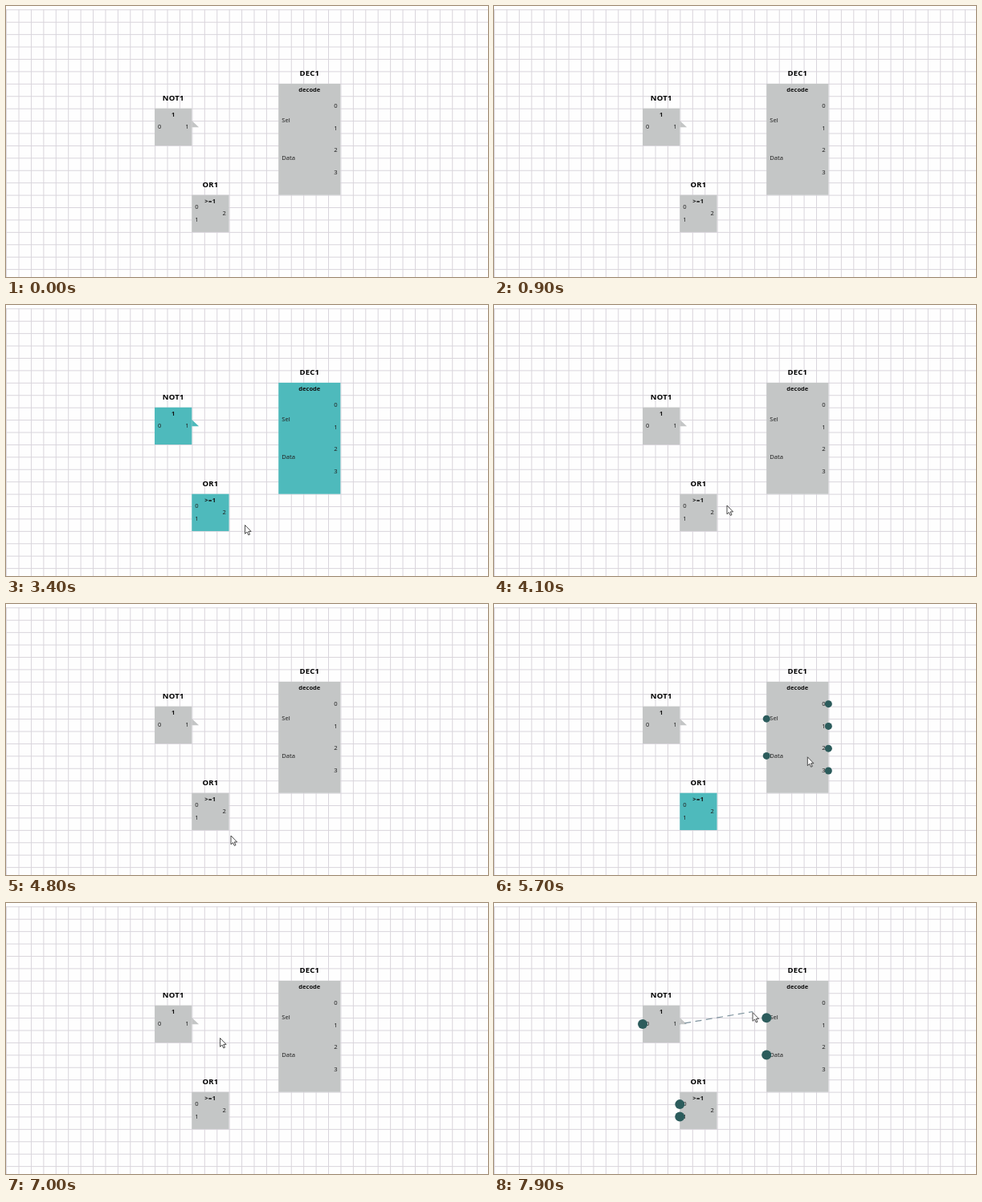
Animation of 600 by 338 pixels, one loop 8000 ms. Source, as an HTML page:

```html
<!DOCTYPE html>
<html lang="en">
<head>
<meta charset="utf-8">
<title>Logic blocks</title>
<style>
  html, body { margin: 0; width: 100%; height: 100%; overflow: hidden; background: #fefefe; }
  svg { display: block; width: 600px; height: 338px; }
  text { font: 7.6px "Noto Sans", "Open Sans", sans-serif; fill: #222; }
  .title { font-size: 9.5px; font-weight: 700; fill: #000; text-anchor: middle; letter-spacing: .2px; }
  .kind { font-size: 7.5px; font-weight: 700; fill: #111; text-anchor: middle; }
  .symbol { letter-spacing: .5px; }
  .right { text-anchor: end; }
  .body { fill: #c4c6c6; }
  .on .body { fill: #4ebabc; }
  .port { fill: #2c5c5c; }
</style>
</head>
<body>
<svg id="stage" viewBox="0 0 600 338"></svg>
<script>
const LOOP = 8000, STEP = 100, TRAVEL = 200;
const CELL = 15.42, TOP = 4.4;
const SELECT_ALL = 1700, CLEAR = 4100, CLEAR_AGAIN = 7000, DRAG = 7500;
const stage = document.getElementById('stage');

function add(parent, tag, attrs = {}, text = '') {
  const el = document.createElementNS('http://www.w3.org/2000/svg', tag);
  for (const key in attrs) el.setAttribute(key, attrs[key]);
  el.textContent = text;
  parent.appendChild(el);
  return el;
}

function show(el, visible) {
  el.setAttribute('visibility', visible ? 'visible' : 'hidden');
}

// Positions and sizes in grid cells, click in ms
const blocks = [
  { title: 'NOT1', kind: '1', col: 12, row: 8, cols: 3, rows: 3,
    inputs: ['0'], outputs: ['1'], tab: true, click: 6500 },
  { title: 'OR1', kind: '>=1', col: 15, row: 15, cols: 3, rows: 3,
    inputs: ['0', '1'], outputs: ['2'], click: 5200 },
  { title: 'DEC1', kind: 'decode', col: 22, row: 6, cols: 5, rows: 9,
    inputs: ['Sel', 'Data'], outputs: ['0', '1', '2', '3'], click: 5800 }
];

// Cursor stops as [arrival ms, x, y]
const visits = [
  { until: 900, stops: [[600, 268, 303], [700, 246, 241], [800, 184, 303]] },
  { until: LOOP, stops: [
    [3300, 305, 299], [3500, 290, 250], [4700, 280, 289], [5200, 260, 266],
    [5500, 390.3, 190.8], [5900, 320, 292], [6100, 204, 167], [6700, 402, 243],
    [6900, 266.5, 168.5], [7400, 230, 150], [7800, 334, 140], [7900, 322, 136.5]
  ] }
];

// Rests at each stop, then makes a short eased move to the next
function cursorAt(t) {
  const visit = visits.find(v => t >= v.stops[0][0] && t < v.until);
  if (!visit) return null;
  const next = visit.stops.findIndex(s => s[0] > t);
  if (next < 0) return visit.stops[visit.stops.length - 1].slice(1);
  const [t0, x0, y0] = visit.stops[next - 1], [t1, x1, y1] = visit.stops[next];
  const u = Math.max(0, 1 - (t1 - t) / Math.min(TRAVEL, t1 - t0));
  const f = u * u * (3 - 2 * u);
  return [x0 + (x1 - x0) * f, y0 + (y1 - y0) * f];
}

function drawGrid() {
  let d = '';
  for (let x = .6; x < 600; x += CELL) d += `M${x} ${TOP}V338`;
  for (let y = TOP + .4; y < 338; y += CELL) d += `M0 ${y}H600`;
  add(stage, 'path', { d, stroke: '#d9d5dc', fill: 'none' });
}

// Ports share the height of the block evenly
function drawPorts(b, labels, x, inset, side) {
  const portY = i => b.y + b.h * (i + 1) / (labels.length + 1);
  labels.forEach((label, i) =>
    add(b.node, 'text', { class: side, x: x + inset, y: portY(i) + 2.1 }, label));
  return labels.map((_, i) =>
    add(b.node, 'circle', { class: 'port', cx: x, cy: portY(i), r: 4.5 }));
}

function drawBlock(b) {
  b.x = b.col * CELL;
  b.y = b.row * CELL + TOP;
  b.w = b.cols * CELL;
  b.h = b.rows * CELL;
  b.right = b.x + b.w;
  const mid = b.x + b.w / 2;
  const symbol = b.kind.startsWith('>') ? ' symbol' : '';
  b.node = add(stage, 'g');
  add(b.node, 'rect', { class: 'body', x: b.x, y: b.y, width: b.w, height: b.h });
  if (b.tab) add(b.node, 'path', { class: 'body', d: `M${b.right} 143l8.8 8.2h-8.8z` });
  add(b.node, 'text', { class: 'title', x: mid, y: b.y - 10.2 }, b.title);
  add(b.node, 'text', { class: 'kind' + symbol, x: mid, y: b.y + 10.5 }, b.kind);
  b.inDots = drawPorts(b, b.inputs, b.x, 4, 'left');
  b.outDots = drawPorts(b, b.outputs, b.right, -3.8, 'right');
}

drawGrid();
blocks.forEach(drawBlock);
const wire = add(stage, 'line', {
  x1: blocks[0].right, y1: blocks[0].y + blocks[0].h / 2,
  stroke: '#7d929d', 'stroke-width': 1.2, 'stroke-dasharray': '8 5.5', 'stroke-dashoffset': 7.5
});
const cursor = add(stage, 'path', {
  d: 'M0 0V10.8L2.5 8.5L4.3 12.4L6 11.7L4.3 7.9H7.6Z',
  fill: '#fff', stroke: '#222', 'stroke-width': .8, 'stroke-linejoin': 'round'
});

function isOver(b, pos) {
  return pos && pos[0] >= b.x && pos[0] <= b.right && pos[1] >= b.y && pos[1] <= b.y + b.h;
}

function render(time) {
  const t = Math.floor(time % LOOP / STEP) * STEP;
  const pos = cursorAt(t);
  const drag = t >= DRAG;

  for (const b of blocks) {
    const hover = !drag && isOver(b, pos);
    const on = (t >= SELECT_ALL && t < CLEAR) || (t >= b.click && t < CLEAR_AGAIN);
    b.node.setAttribute('class', on ? 'on' : '');
    for (const dot of b.inDots) {
      show(dot, hover || drag);
      dot.setAttribute('r', drag ? 6 : 4.5);
    }
    for (const dot of b.outDots) show(dot, hover);
  }

  show(cursor, pos);
  show(wire, drag);
  if (pos) cursor.setAttribute('transform', `translate(${pos[0]} ${pos[1]})`);
  if (drag) {
    wire.setAttribute('x2', pos[0]);
    wire.setAttribute('y2', pos[1] - 1);
  }
}

const start = performance.now();
function tick() {
  render(performance.now() - start);
  requestAnimationFrame(tick);
}
tick();
</script>
</body>
</html>
```
